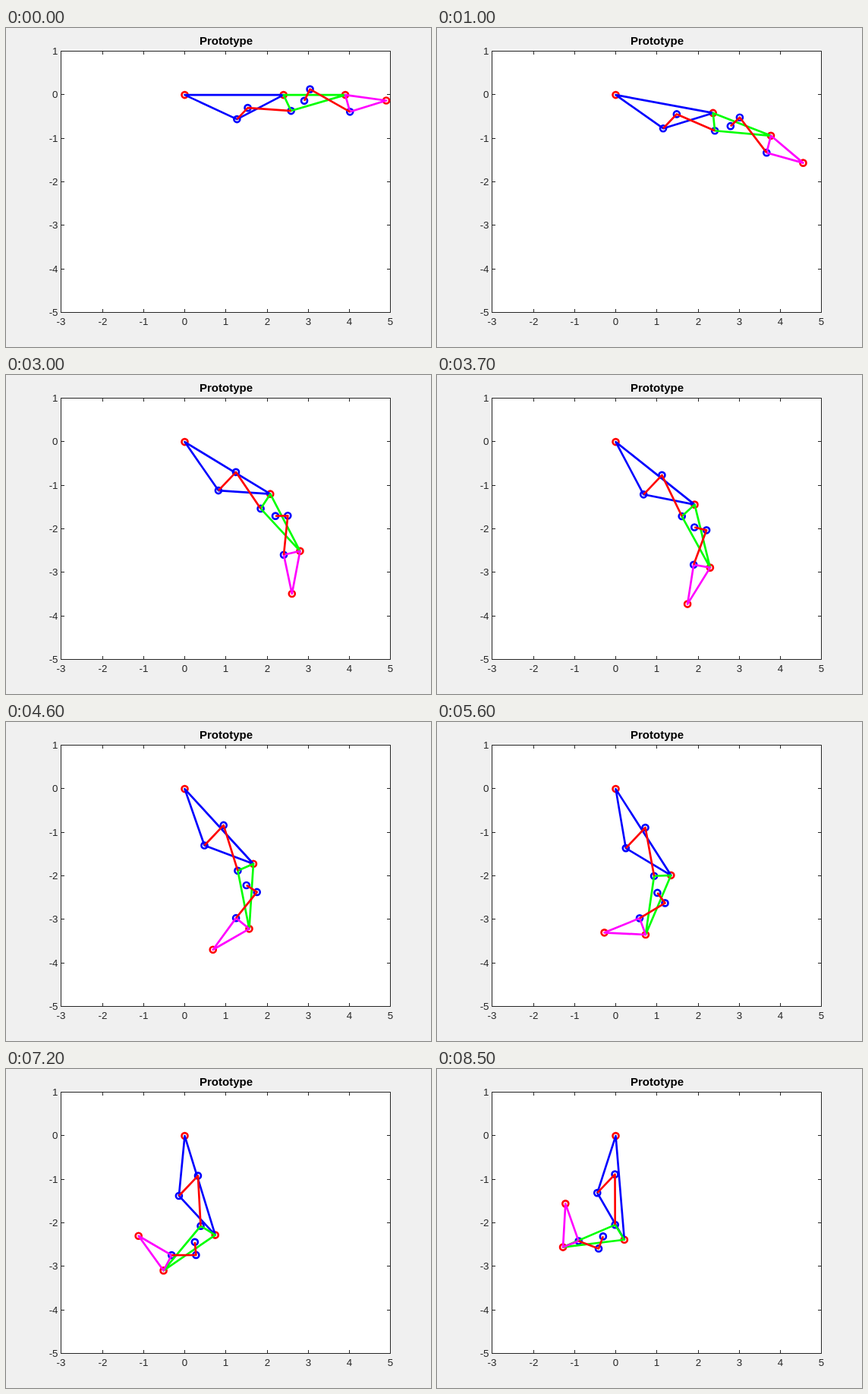
Write an HTML page that moves like this. It is 560 px wide and 420 px high and loops after 8600 ms.

```html
<!DOCTYPE html>
<html lang="en">
<head>
<meta charset="utf-8">
<title>Linkage</title>
<style>
  html, body { margin: 0; width: 100%; height: 100%; overflow: hidden; background: #f0f0f0; }
  svg { display: block; width: 560px; height: 420px; }
  text { font: 13.33px "Liberation Sans", Arial, sans-serif; fill: #262626; }
  .title { font-weight: bold; font-size: 15px; fill: #000; }
  .axes { fill: none; stroke: #262626; stroke-width: 1; }
  .linkage { fill: none; stroke-width: 2.67; stroke-linejoin: round; }
</style>
</head>
<body>
<svg viewBox="0 0 560 420">
  <rect width="560" height="420" fill="#f0f0f0"/>
  <rect x="72.5" y="30.5" width="434" height="344" fill="#fff"/>
  <path class="axes" id="axes"/>
  <g id="labels"></g>
  <text class="title" x="290" y="22" text-anchor="middle">Prototype</text>
  <g class="linkage" id="linkage"></g>
</svg>
<script>
const NS = "http://www.w3.org/2000/svg";
const STEP_MS = 100, STEPS = 86;
const BLUE = "#00f", RED = "#f00", GREEN = "#0f0", MAGENTA = "#f0f";

function add(parent, tag, attrs, text) {
  const el = document.createElementNS(NS, tag);
  for (const key in attrs) el.setAttribute(key, attrs[key]);
  if (text !== undefined) el.textContent = text;
  return document.getElementById(parent).appendChild(el);
}

function drawAxes() {
  let d = "M72.5 30.5H506.5V374.5H72.5Z";
  for (let v = -3; v <= 5; v++) {
    const x = Math.floor(72.8 + 54.25 * (v + 3)) + 0.5;
    d += `M${x} 374.5v-4.5M${x} 30.5v4.5`;
    add("labels", "text", { x, y: 391, "text-anchor": "middle" }, v);
  }
  for (let v = -5; v <= 1; v++) {
    const y = Math.floor(30.6 + 57.3 * (1 - v)) + 0.5;
    d += `M72.5 ${y}h4.5M506.5 ${y}h-4.5`;
    add("labels", "text", { x: 68.5, y: y + 4.5, "text-anchor": "end" }, v);
  }
  document.getElementById("axes").setAttribute("d", d);
}

// Places a point given in a body's own frame, turned about its pivot.
function turn([px, py], degrees, x, y) {
  const a = degrees * Math.PI / 180, c = Math.cos(a), s = Math.sin(a);
  return [px + x * c - y * s, py + x * s + y * c];
}

function pose(n) {
  const base = [0, 0], a1 = -n, a2 = -2.04 * n, a3 = -7.4 - 3.13 * n;
  const knuckle = turn(base, a1, 2.4, 0);
  const anchor = turn(base, a1, 1.269, -0.56);
  const middle = turn(knuckle, a2, 1.5, 0);
  const slide = 0.262 + 0.0073 * n - 6.28e-5 * n * n;
  return {
    base, knuckle, anchor, middle,
    slider: [anchor[0] + slide, anchor[1] + slide],
    lever: turn(knuckle, a2, 0.183, -0.367),
    post: turn(knuckle, a2, 0.504, -0.135),
    arm: turn(knuckle, a2, 0.643, 0.131),
    tip: turn(middle, a3, 1.003, 0),
    heel: turn(middle, a3, 0.163, -0.371)
  };
}

const toPixels = ([x, y]) => [235.5 + 54.25 * x, 88.1 - 57.15 * y].map(v => v.toFixed(2));

drawAxes();

const joints = [
  [RED, "base knuckle middle tip"],
  [BLUE, "anchor slider lever post arm heel"]
].flatMap(([stroke, names]) => names.split(" ").map(name =>
  ({ name, el: add("linkage", "circle", { r: 4, stroke }) })));

const links = [
  [BLUE, "base knuckle anchor", "Z"],
  [GREEN, "knuckle middle lever", "Z"],
  [MAGENTA, "middle tip heel", "Z"],
  [RED, "anchor slider lever", ""],
  [RED, "post arm heel", ""]
].map(([stroke, names, end]) =>
  ({ names: names.split(" "), end, el: add("linkage", "path", { stroke }) }));

function draw(n) {
  const points = pose(n);
  for (const { name, el } of joints) {
    const [x, y] = toPixels(points[name]);
    el.setAttribute("cx", x);
    el.setAttribute("cy", y);
  }
  for (const { names, end, el } of links) {
    el.setAttribute("d", "M" + names.map(name => toPixels(points[name]).join(" ")).join("L") + end);
  }
}

const start = performance.now();
function frame() {
  draw(Math.floor((performance.now() - start) / STEP_MS) % STEPS);
  requestAnimationFrame(frame);
}
frame();
</script>
</body>
</html>
```
